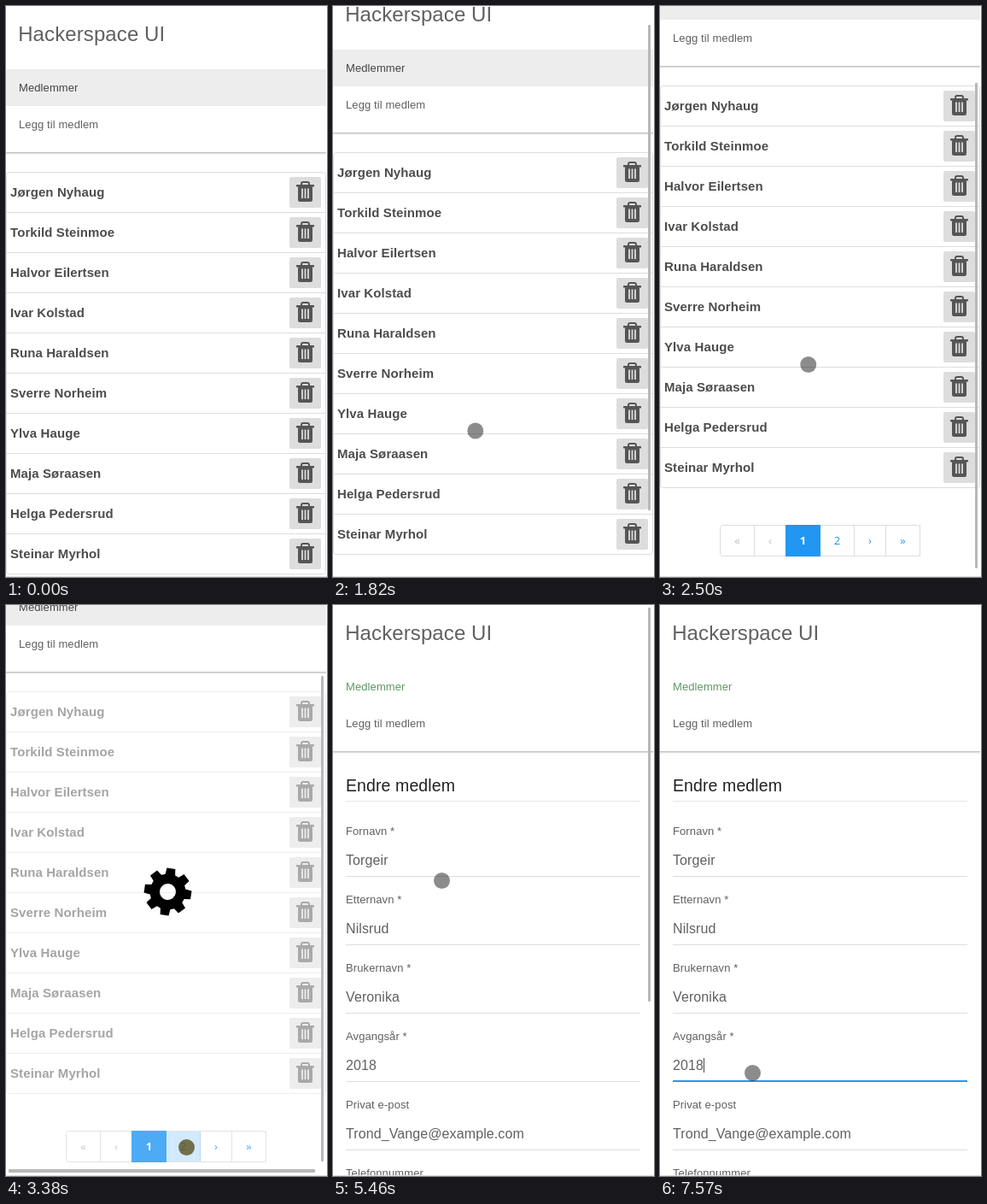
Write an HTML page that moves like this. It is 376x668 px and loops after 8000 ms.

```html
<!DOCTYPE html>
<html lang="no">
<head>
<meta charset="utf-8">
<style>
html, body { margin: 0; width: 100%; height: 100%; overflow: hidden; background: #fff; }
svg { display: block; width: 376px; height: 668px; font-family: "Liberation Sans", Arial, sans-serif; letter-spacing: .1px; }
.pager { font: 13px "Open Sans", sans-serif; text-anchor: middle; }
</style>
</head>
<body>
<svg viewBox="0 0 376 668">
  <defs>
    <g id="trash" fill="#555">
      <path d="M6 4V3Q6 1 8 1H13Q15 1 15 3V4" fill="none" stroke="#555" stroke-width="2"/>
      <rect y="4" width="21" height="2.5" rx=".5"/>
      <rect x="2" y="5" width="17" height="19" rx="2.5"/>
      <path d="M7 8.5V20M10.5 8.5V20M14 8.5V20" stroke="#ddd" stroke-width="1.8"/>
    </g>
  </defs>
  <g id="page"></g>
  <path id="gear" fill-rule="evenodd"/>
  <g id="bars" fill="#b8b8b8">
    <rect id="vbar" x="369" width="3" rx="1"/>
    <rect id="hbar" x="3" y="660" width="359" height="4" rx="1"/>
  </g>
  <rect y="667" width="376" height="1" fill="#ddd"/>
  <circle id="dot" r="9.5"/>
</svg>
<script>
const $ = id => document.getElementById(id);
const rect = (x, y, w, h, fill, more = '') =>
  `<rect x="${x}" y="${y}" width="${w}" height="${h}" fill="${fill}" ${more}/>`;
// cy is the middle of the capitals
const text = (x, cy, size, s, fill = '#606060', more = '') =>
  `<text x="${x}" y="${Math.round(cy + size * .36)}" font-size="${size}" fill="${fill}" ${more}>${s}</text>`;

const header = text(14.2, 32, 24, 'Hackerspace UI') +
  rect(0, 74, 375, 43, '#ededed', 'id="tab"') +
  text(15, 95.5, 13, 'Medlemmer', '#444', 'id="tabText"') +
  text(15, 138.5, 13, 'Legg til medlem') +
  [.23, .12, .03].map((a, i) => rect(0, 171 + i, 375, 1, `rgba(0,0,0,${a})`)).join('');

function list(names) {
  const rows = names.map((name, i) => {
    const y = 194 + 47 * i;
    return (i ? rect(0, y, 375, 1, '#ddd') : '') +
      text(5, y + 24, 15, name, '#4c4c4c', 'font-weight="bold"') +
      rect(332, y + 6, 37, 36, '#ddd', 'rx="2"') +
      `<use href="#trash" x="340" y="${y + 11}"/>`;
  });
  return rect(.5, 194.5, 374, 47 * names.length, 'none', 'stroke="#ddd" rx="3"') + rows.join('');
}

function pager(y, active, disabled) {
  let x = 70, out = rect(70.5, y + .5, 234, 36, '#fff', 'stroke="#ddd" rx="3"');
  for (const s of '«‹12›»') {
    const w = '‹›'.includes(s) ? 37 : 40, on = s === active;
    const color = on ? '#fff' : disabled.includes(s) ? '#bbb' : '#2196f3';
    out += (on ? rect(x, y, w + 1, 37, '#2196f3') : rect(x + w, y, 1, 37, '#ddd')) +
      `<text x="${x + w / 2 + .5}" y="${y + 23}" fill="${color}" ${on ? 'font-weight="bold"' : ''}>${s}</text>`;
    x += w;
  }
  return `<g class="pager">${out}</g>`;
}

const fields = [['Fornavn *', 'Torgeir'], ['Etternavn *', 'Nilsrud'], ['Brukernavn *', 'Veronika'],
  ['Avgangsår *', '2018'], ['Privat e-post', 'Trond_Vange@example.com'], ['Telefonnummer', '']];
const form = text(15, 211, 19.5, 'Endre medlem', '#212121') + rect(15, 229, 345, 1, '#e5e5e5') +
  fields.map(([label, value], i) => text(15, 264.5 + 80 * i, 13, label) +
    text(15, 298.5 + 80 * i, 16, value) + rect(15, 317 + 80 * i, 345, 1, '#ddd')).join('') +
  `<g id="focus">${rect(15, 556, 345, 2, '#2196f3')}${rect(51, 530, 1, 17, '#444')}</g>`;

$('page').innerHTML = header +
  `<g id="first"><g id="list1">${list(['Jørgen Nyhaug', 'Torkild Steinmoe', 'Halvor Eilertsen', 'Ivar Kolstad',
    'Runa Haraldsen', 'Sverre Norheim', 'Ylva Hauge', 'Maja Søraasen', 'Helga Pedersrud', 'Steinar Myrhol'])}</g>
    <g id="pager1">${pager(708, '1', '«‹')}</g>
    ${rect(188, 709, 40, 35, 'rgba(33,150,243,.2)', 'id="tap"')}</g>
  <g id="second">${list(['Mathis Nordlie', 'Øystein Sæbøen', 'Torgeir Nilsrud', 'Una Lie',
    'Gunda Mathisrud', 'Vegard Jonasrud', 'Odd-Torgeir Nymoen'])}${pager(567, '2', '›»')}</g>
  <g id="form">${form}</g>`;

const point = (r, a) => `${r * Math.cos(a)} ${r * Math.sin(a)}`;
let teeth = [];
for (let a = 0; a < 6.28; a += Math.PI / 4)
  teeth.push(point(21, a - .28), point(28, a - .18), point(28, a + .18), point(21, a + .28));
$('gear').setAttribute('d', `M${teeth.join('L')}ZM9.5 0A9.5 9.5 0 1 0 -9.5 0A9.5 9.5 0 1 0 9.5 0Z`);

const clamp = (v, lo = 0, hi = 1) => Math.min(hi, Math.max(lo, v));
const TICK = 1000 / 9, MAX_SCROLL = 101;
const DRAG = 1640, TAP = 3160, LOAD = 3260, LOADED = 3711, EDIT = 5240, FOCUS = 7450;

// pointer moves: start, end, x, y, power of the ease-in
const moves = [[500, 1280, 162, 464], [1400, DRAG, 167, 520], [DRAG, 2160, 162, 350, 2], [2280, TAP, 207, 626],
  [TAP, 3380, 211, 634], [3600, 4620, 127, 322], [6130, 6810, 108, 547]];
function pointer(t) {
  let x = 24, y = 205;
  for (const [a, b, x1, y1, power = 1] of moves) {
    const k = clamp((t - a) / (b - a)) ** power;
    x += (x1 - x) * k;
    y += (y1 - y) * k;
  }
  return [x, y];
}

// the page follows the pointer while it is held down
function scrollAt(t, y) {
  if (t < DRAG || t >= LOADED) return 0;
  if (t < 2280) return clamp(520 - y, 0, MAX_SCROLL);
  return MAX_SCROLL - (t > TAP ? y - 626 : 0);
}

const fade = (t, from, to) => clamp(Math.min((t - from) / 100, (to + 330 - t) / 330));

const set = (id, name, v) => $(id).setAttribute(name, v);
const show = (id, on) => { $(id).style.display = on ? '' : 'none'; };

function draw(now) {
  // nine pictures a second
  const t = 500 + TICK * Math.floor((now - 485) / TICK);
  const loading = t > LOAD && t < LOADED, editing = now >= EDIT;
  const [x, y] = pointer(t), scroll = Math.round(scrollAt(t, y));
  set('page', 'transform', `translate(0 ${-scroll})`);
  show('first', t < LOADED);
  show('second', t >= LOADED && !editing);
  show('form', editing);
  show('tab', !editing);
  set('tabText', 'fill', editing ? '#5f9765' : '#444');
  set('list1', 'opacity', loading ? .5 : 1);
  set('pager1', 'opacity', loading ? .8 : 1);
  show('tap', loading);
  show('gear', loading);
  set('gear', 'transform', `translate(189.5 335.5) rotate(${8 + (t - 3388) * .18})`);
  set('vbar', 'y', editing ? 3 : 2 + scroll * .87);
  set('vbar', 'height', editing ? 461 : 568);
  set('bars', 'opacity', fade(t, DRAG, 2500) + fade(t, TAP, 3600) + fade(t, EDIT, 6240));
  show('hbar', loading);
  set('focus', 'opacity', clamp((t - FOCUS) / 49));
  show('dot', t >= 500);
  set('dot', 'cx', x + .5);
  set('dot', 'cy', y + .5);
  set('dot', 'fill', loading ? 'rgba(90,80,30,.8)' : 'rgba(0,0,0,.45)');
}

const start = performance.now();
function frame() {
  draw((performance.now() - start) % 8000);
  requestAnimationFrame(frame);
}
frame();
</script>
</body>
</html>
```
